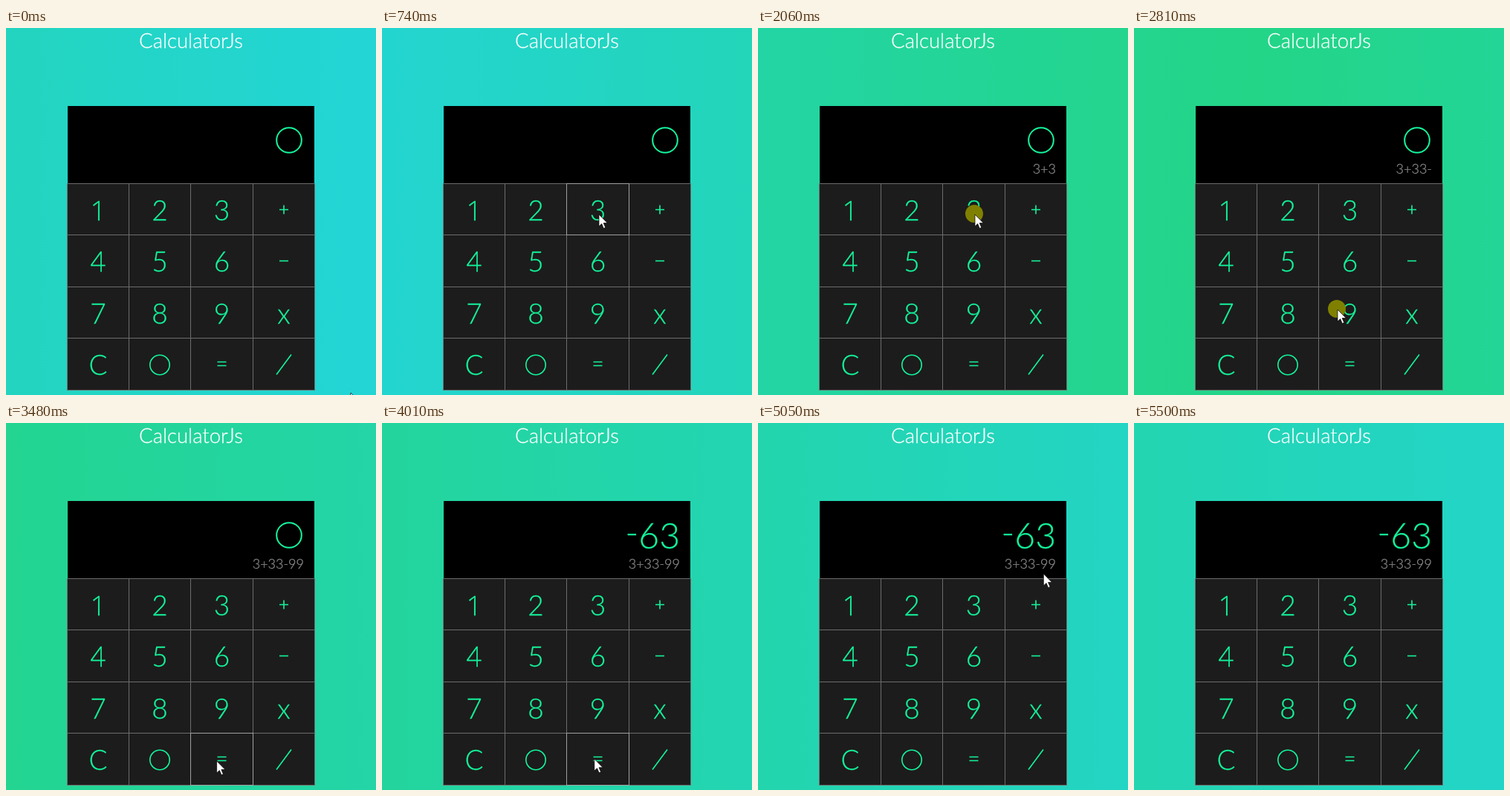
An HTML page that plays this animation: 498x494 px, repeating every 5530 ms.

```html
<!DOCTYPE html>
<html lang="en">
<head>
<meta charset="utf-8">
<title>CalculatorJs</title>
<style>
  html, body { margin: 0; width: 100%; height: 100%; overflow: hidden; }
  svg { display: block; width: 498px; height: 494px; }
  text { font-family: Lato, "Open Sans", sans-serif; font-weight: 300; fill: currentColor; stroke: currentColor; stroke-width: .3; }
  svg { color: #14f59b; }
  .mid { text-anchor: middle; }
  .end { text-anchor: end; }
  .line { fill: none; stroke: currentColor; stroke-width: 1.6; }
  .one { font-family: "Open Sans", sans-serif; }
</style>
</head>
<body>
<svg viewBox="0 0 498 494">
  <defs>
    <linearGradient id="sky" gradientUnits="userSpaceOnUse" x1="0" x2="1700" y1="0" y2="0" spreadMethod="reflect">
      <stop stop-color="#23d5d5"/>
      <stop offset="1" stop-color="#23d587"/>
    </linearGradient>
  </defs>
  <rect width="498" height="494" fill="url(#sky)"/>
  <text class="mid" x="249" y="27" font-size="27.5" color="#fff">CalculatorJs</text>
  <rect x="83" y="105" width="332" height="104"/>
  <circle id="zero" class="line" cx="381" cy="151" r="16.8" style="stroke-width:2"/>
  <text id="result" class="end" x="401" y="169" font-size="48"><tspan dy="-5">-</tspan><tspan dy="5">63</tspan></text>
  <text id="sum" class="end" x="401" y="196" font-size="18" color="#8a8a8a"></text>
  <g id="keys"></g>
  <rect id="hover" fill="none" stroke="#a0a0a0"/>
  <circle id="click" r="12" cx="-1" cy="-1" fill="#808000"/>
  <path id="arrow" d="M0 0V16L3.7 12.6 6.3 18.7 8.8 17.6 6.2 11.6H11.4Z" fill="#fff" stroke="#000" stroke-width=".7"/>
  <path id="beam" d="M-4 -8.5H4M0 -8.5V8.5M-4 8.5H4" fill="none" stroke="#fff" stroke-width="1.3"/>
</svg>
<script>
const $ = id => document.getElementById(id);
const LOOP = 5530, FIRST = 830, BEAT = 390;
const typed = '3+33-99=', labels = '123+456-789xC0=/';

// Grid lines fall on whole pixels, halves rounding down
const snap = v => Math.ceil(v - .5);
const colX = c => snap(82 + 83.25 * c);
const rowY = r => snap(209 + 69.5 * r);

function cellBox(i) {
  const c = i % 4, r = i >> 2, x = colX(c), y = rowY(r);
  return { x: x + .5, y: y + .5, width: colX(c + 1) - x, height: rowY(r + 1) - y };
}

function set(id, attrs) {
  for (const k in attrs) $(id).setAttribute(k, attrs[k]);
}
const show = (id, on) => set(id, { visibility: on ? 'visible' : 'hidden' });

// Symbols drawn around the middle of their key
const signs = {
  '+': 'M-6 0H6M0 -6V6',
  '-': 'M-6 0H6',
  '=': 'M-6 -3H6M-6 2H6',
  '/': 'M-10 14L10 -13'
};

function drawKey(label, i) {
  const b = cellBox(i), x = b.x + b.width / 2, y = b.y;
  const box = `<rect x="${b.x}" y="${y}" width="${b.width}" height="${b.height}" fill="#1c1c1c" stroke="#6c6c6c"/>`;
  if (signs[label])
    return box + `<path class="line" transform="translate(${x} ${y + 35})" d="${signs[label]}"/>`;
  if (label === '0')
    return box + `<circle class="line" cx="${x}" cy="${y + 36}" r="13.2"/>`;
  return box + `<text class="mid${label === '1' ? ' one' : ''}" x="${x}" y="${y + 49.5}" font-size="37">${label}</text>`;
}
$('keys').innerHTML = [...labels].map(drawKey).join('');

// Where the pointer rests on each key it presses
const spots = { '3': [292, 251], '+': [362, 250], '-': [362, 312], '9': [274, 379], '=': [284, 458] };
const stops = [
  { time: 0, pos: [464, 491] },
  ...[...typed].map((key, i) => ({ time: FIRST + BEAT * i, pos: spots[key], key })),
  { time: 4590, pos: [375, 167] },
  { time: LOOP, pos: [464, 510] }
];

// Rest after each stop, then glide so as to arrive a little before the next
function pointer(t) {
  const i = stops.findIndex(s => s.time > t), a = stops[i - 1], b = stops[i];
  const phase = (t - a.time) / (b.time - a.time);
  const p = Math.min(1, Math.max(0, (phase - .4) / .45));
  const e = p * p * (3 - 2 * p);
  const [x, y] = a.pos.map((v, n) => v + (b.pos[n] - v) * e);
  return { x, y, key: e < .1 ? a.key : e > .9 ? b.key : null };
}

function draw(t) {
  const drift = 3080 * (1 - (1 - t / LOOP) ** 1.5) - 480;
  set('sky', { gradientTransform: `translate(${-drift} 0)` });

  const { x, y, key } = pointer(t);
  const inText = x > 325 && x < 405 && y > 130 && y < 200;
  for (const id of ['arrow', 'beam', 'click']) set(id, { transform: `translate(${x} ${y})` });
  show('arrow', !inText);
  show('beam', inText);

  const sinceClick = t < FIRST ? Infinity : (t - FIRST) % BEAT;
  const pressed = sinceClick < 130 && t < FIRST + BEAT * typed.length;
  show('click', pressed);

  const over = key && !pressed;
  if (over) set('hover', cellBox(labels.indexOf(key)));
  show('hover', over);

  // The display follows each click after a short delay
  const done = Math.max(0, Math.floor((t - FIRST - 90) / BEAT) + 1);
  $('sum').textContent = typed.slice(0, Math.min(done, typed.length - 1));
  show('zero', done < typed.length);
  show('result', done >= typed.length);
}

const start = performance.now();
function tick() {
  draw((performance.now() - start) % LOOP);
  requestAnimationFrame(tick);
}
tick();
</script>
</body>
</html>
```
